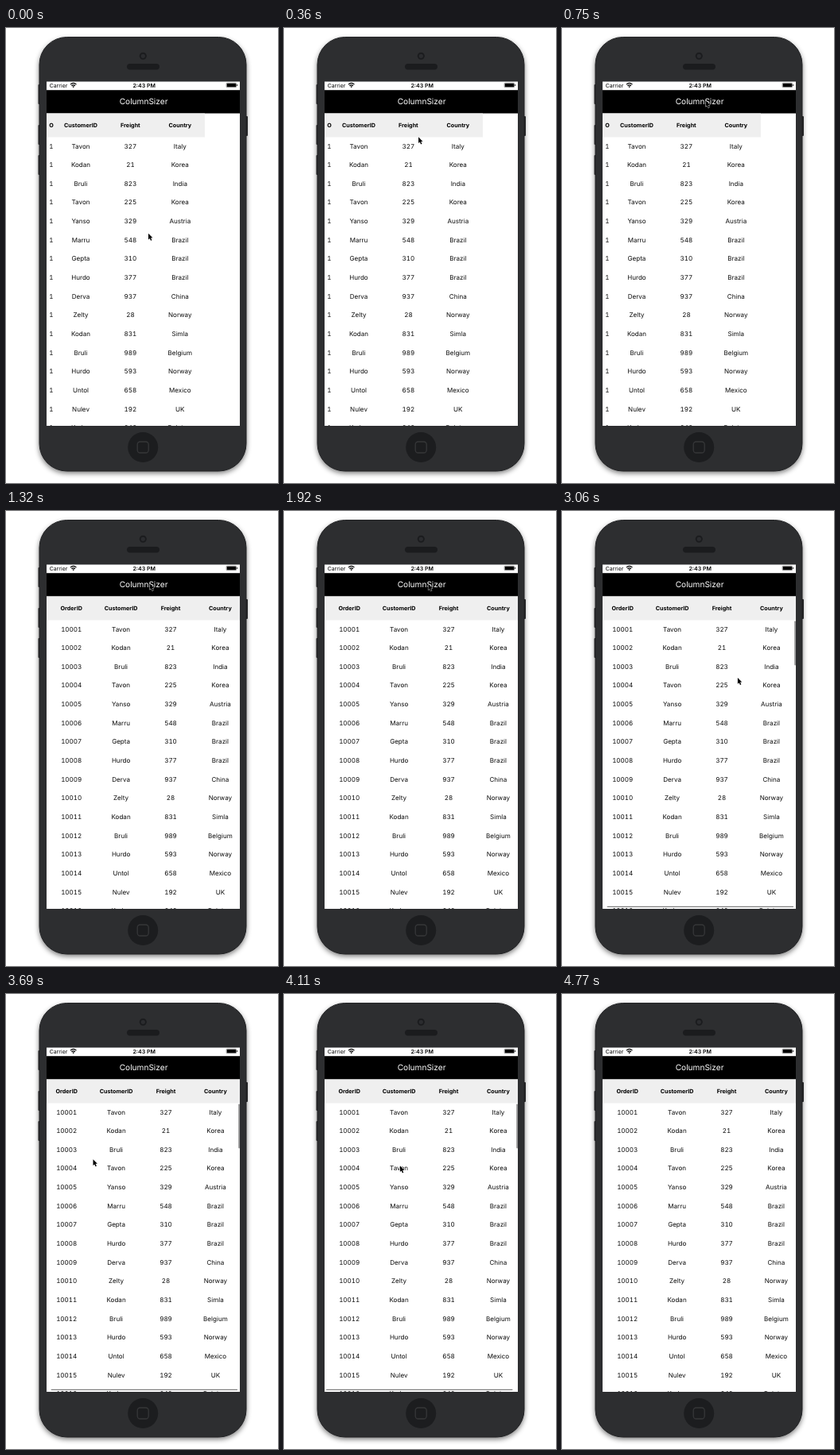
An HTML page for the animation above (5.58 s loop, 342 px wide and 573 px high).

```html
<!DOCTYPE html>
<html lang="en">
<head>
<meta charset="utf-8">
<title>Column sizer</title>
<style>
  html, body { margin: 0; width: 100%; height: 100%; overflow: hidden; background: #fff; }
  svg { display: block; width: 342px; height: 573px; }
  text { font-family: Inter, "Liberation Sans", sans-serif; text-anchor: middle; text-rendering: geometricPrecision; }
  #head text { font-size: 7.2px; font-weight: 700; }
  #body text { font-size: 8.05px; fill: #0c0c0c; font-variant-numeric: tabular-nums; }
</style>
</head>
<body>
<svg viewBox="0 0 342 573" xmlns="http://www.w3.org/2000/svg">
  <defs>
    <filter id="soft" x="-10%" y="-10%" width="120%" height="120%"><feGaussianBlur stdDeviation="3.2"/></filter>
    <clipPath id="screen"><rect x="51" y="67.5" width="243" height="433.5"/></clipPath>
  </defs>
  <rect x="41.5" y="14" width="261" height="547" rx="35" opacity=".5" filter="url(#soft)"/>
  <g fill="#242527">
    <rect x="40.5" y="71" width="4" height="25" rx="1"/>
    <rect x="40.5" y="122" width="4" height="25" rx="1"/>
    <rect x="40.5" y="160" width="4" height="25" rx="1"/>
    <rect x="300" y="111" width="4" height="25" rx="1"/>
  </g>
  <rect x="42" y="11.5" width="260" height="546.5" rx="34.5" fill="#2d2e30" stroke="#222325"/>
  <circle cx="172.3" cy="35.3" r="4.5" fill="#1b1c1e"/>
  <circle cx="172.3" cy="35.3" r="2.6" fill="#2b2c2f"/>
  <rect x="152" y="45" width="41" height="7.5" rx="3.7" fill="#1b1c1e"/>
  <circle cx="172.2" cy="528" r="19" fill="#1c1d1f"/>
  <rect x="165.2" y="521" width="14" height="14" rx="3.5" fill="none" stroke="#363739" stroke-width="1.3"/>

  <g clip-path="url(#screen)">
    <rect x="51" y="67" width="243" height="434" fill="#fff"/>
    <rect x="51" y="78.2" width="243" height="29.3"/>
    <text x="173.1" y="96.3" font-size="10.1" fill="#fff">ColumnSizer</text>
    <text x="66" y="74.6" font-size="6.9">Carrier</text>
    <text x="173.7" y="74.6" font-size="7" font-weight="600">2:43 PM</text>
    <path d="M80.9 71.1Q84.7 67.7 88.5 71.1M82.4 72.8Q84.7 70.8 87 72.8" fill="none" stroke="#000" stroke-width="1.2"/>
    <path d="M83.4 73.8Q84.7 72.8 86 73.8L84.7 75.2Z"/>
    <rect x="277.2" y="69.3" width="12.4" height="5.4" rx="1.2" fill="none" stroke="#000" stroke-width=".5"/>
    <rect x="277.8" y="69.9" width="11.2" height="4.2" rx=".6"/>
    <rect x="290.2" y="71" width=".9" height="2" rx=".4"/>
    <g id="grid">
      <rect id="band" x="51" y="107.5" height="30" fill="#efefef"/>
      <g id="head"></g>
      <g id="body"></g>
    </g>
    <g id="bars" fill="#000" fill-opacity=".5">
      <rect x="292.3" y="138.5" width="1.5" height="56" rx=".7"/>
      <rect id="hbar" y="497.7" width="234.5" height="1.4" rx=".7"/>
    </g>
  </g>
  <path id="cursor" d="M0 0V7.7L1.8 6.2L3 9.1L4.4 8.5L3.1 5.6H5.4Z" stroke="#fff" stroke-width=".8" stroke-linejoin="round" paint-order="stroke"/>
</svg>
<script>
const LOOP = 5580, STEP = 30, LEFT = 51, COL = 62.4, NARROW = 11.8, ROW = 23.65;
const $ = id => document.getElementById(id);

const titles = ["OrderID", "CustomerID", "Freight", "Country"];
const rows = `Tavon 327 Italy
Kodan 21 Korea
Bruli 823 India
Tavon 225 Korea
Yanso 329 Austria
Marru 548 Brazil
Gepta 310 Brazil
Hurdo 377 Brazil
Derva 937 China
Zelty 28 Norway
Kodan 831 Simla
Bruli 989 Belgium
Hurdo 593 Norway
Untol 658 Mexico
Nulev 192 UK
Kodan 646 Belgium`.split("\n").map((line, i) => [String(10001 + i), ...line.split(" ")]);

// Cursor keys: time, x, y
const path = [
  [0, 179, 258.7], [270, 168.2, 165.7], [570, 174.5, 92.1], [750, 180.8, 91.4],
  [1890, 180.8, 91.4], [1920, 181.4, 91.8], [2070, 181.4, 91.8], [2520, 257.4, 208.8],
  [2820, 257.4, 208.8], [3060, 220.9, 210], [3390, 104.5, 207.2], [3540, 104.5, 207.2],
  [3690, 109.5, 208.2], [4110, 145.9, 216.3], [4680, 229.9, 215.9], [4740, 278.9, 211.2]
];

const cells = [];
function addCell(parent, label, col, y) {
  const el = document.createElementNS("http://www.w3.org/2000/svg", "text");
  el.setAttribute("y", y);
  parent.append(el);
  cells.push({ el, label, col });
}
titles.forEach((label, col) => addCell($("head"), label, col, 125));
rows.forEach((row, i) => row.forEach((label, col) => addCell($("body"), label, col, 151.5 + i * ROW)));

// The first column starts too narrow for more than one character.
function layout(wide) {
  const first = wide ? COL : NARROW;
  for (const { el, label, col } of cells) {
    el.textContent = wide || col ? label : label[0];
    el.setAttribute("x", LEFT + (col ? first + (col - .5) * COL : first / 2));
  }
  $("band").setAttribute("width", first + 3 * COL);
}

const clamp = v => Math.min(1, Math.max(0, v));
const ramp = (t, a, b) => { const p = clamp((t - a) / (b - a)); return p * p * (3 - 2 * p); };

function slope(i, k) {
  const d = path[i + 1], c = path[i], b = path[i - 1];
  if (!b || !d) return b ? (c[k] - b[k]) / (c[0] - b[0]) : 0;
  const m = (c[k] - b[k]) / (c[0] - b[0]), n = (d[k] - c[k]) / (d[0] - c[0]);
  return m * n > 0 ? 2 * m * n / (m + n) : 0;
}

// Monotone cubic through the keys, so pauses stay still.
function along(t, k) {
  let i = path.length - 2;
  while (i > 0 && path[i][0] > t) i--;
  const a = path[i], b = path[i + 1], h = b[0] - a[0], p = clamp((t - a[0]) / h), q = 1 - p;
  return a[k] * q * q * (1 + 2 * p) + b[k] * p * p * (3 - 2 * p)
    + h * p * q * (slope(i, k) * q - slope(i + 1, k) * p);
}

let wasWide;
function draw(time) {
  const t = Math.floor((time % LOOP) / STEP) * STEP;
  const wide = t >= 1320;
  if (wide !== wasWide) layout(wasWide = wide);

  const part = ramp(t, 2850, 3030) - ramp(t, 3690, 3900);
  $("grid").setAttribute("transform", `translate(${-6 * part} 0)`);
  $("hbar").setAttribute("x", 53 + 3.6 * part);
  $("bars").setAttribute("opacity", ramp(t, 2850, 2970) - ramp(t, 4260, 4560));

  $("cursor").setAttribute("transform", `translate(${along(t, 1)} ${along(t, 2)})`);
  $("cursor").setAttribute("visibility", t < 4770 ? "visible" : "hidden");
}

const start = performance.now();
function tick() {
  draw(performance.now() - start);
  requestAnimationFrame(tick);
}
tick();
</script>
</body>
</html>
```
